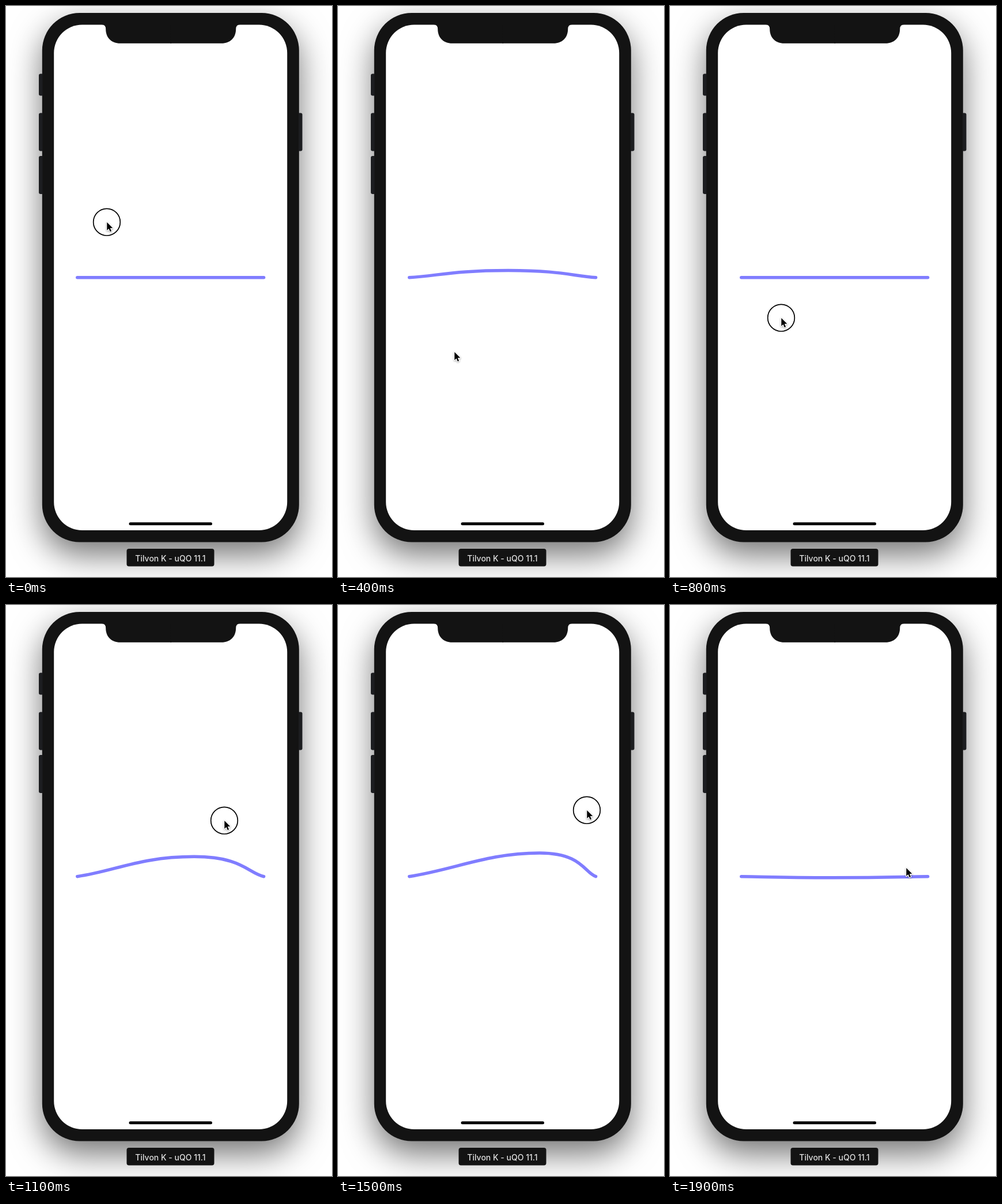
Recreate the animation shown at these times as an HTML page with a canvas. Size 566 px wide and 990 px high, loop 2000 ms.

```html
<!DOCTYPE html>
<html lang="en">
<head>
<meta charset="utf-8">
<title>Plucked string</title>
<style>
  html, body { margin: 0; width: 100%; height: 100%; overflow: hidden; background: #fff; }
  canvas { display: block; }
</style>
</head>
<body>
<canvas id="stage" width="566" height="990"></canvas>
<script>
const ctx = document.getElementById('stage').getContext('2d');

const LOOP = 2000, STEP = 100;
const MID = 285.7, HALF = 161.9, LINE_Y = 470.7;
const BODY = '#131313', BUTTON = '#1c1d20';

// Turning points of the pointer
const PATH = [
  { t: 0, x: 175, y: 375 },
  { t: 300, x: 202, y: 597 },
  { t: 400, x: 202, y: 600 },
  { t: 800, x: 193, y: 541 },
  { t: 1100, x: 379, y: 374 },
  { t: 1400, x: 432, y: 356 },
  { t: 1700, x: 432, y: 356 },
  { t: 1900, x: 410, y: 456 }
];

// dir: 1 drags the string down, -1 drags it up
const PLUCKS = [
  { press: 0, release: 333, dir: 1 },
  { press: 800, release: 1540, dir: -1 }
];

const mix = (a, b, k) => a + (b - a) * k;

function pointerAt(t) {
  const b = PATH.find(p => p.t >= t);
  const a = PATH.findLast(p => p.t <= t);
  const k = a === b ? 0 : (t - a.t) / (b.t - a.t);
  return { x: mix(a.x, b.x, k), y: mix(a.y, b.y, k) };
}

// Offset of the string's peak from the middle of the line
function pull({ x, y }, dir) {
  return {
    dx: 0.44 * (x - MID),
    dy: 0.355 * dir * Math.max(0, dir * (y - LINE_Y))
  };
}

function stringAt(t, { release, dir }) {
  if (t < release) return pull(pointerAt(t), dir);
  const { dx, dy } = pull(pointerAt(release), dir);
  const s = (t - release) / 1000;
  const swing = Math.exp(-5.6 * s) * Math.cos(2 * Math.PI * s / 0.2133);
  return { dx: dx * swing, dy: dy * swing };
}

function box(x, y, w, h, r, color) {
  ctx.fillStyle = color;
  ctx.beginPath();
  ctx.roundRect(x, y, w, h, r);
  ctx.fill();
}

function drawNotch() {
  ctx.save();
  ctx.translate(286.2, 0);
  ctx.fillStyle = BODY;
  for (const side of [-1, 1]) {
    ctx.beginPath();
    ctx.moveTo(-side, 32);
    ctx.lineTo(side * 120, 32);
    ctx.quadraticCurveTo(side * 113, 32.5, side * 113, 40);
    ctx.bezierCurveTo(side * 113, 55, side * 103, 64.8, side * 88, 64.8);
    ctx.lineTo(-side, 64.8);
    ctx.fill();
  }
  ctx.restore();
}

function drawPhone() {
  ctx.fillStyle = '#fff';
  ctx.fillRect(0, 0, 566, 990);

  ctx.save();
  ctx.shadowColor = 'rgba(0,0,0,.55)';
  ctx.shadowBlur = 56;
  ctx.shadowOffsetY = 22;
  box(62.8, 12, 446, 917.5, 65, BODY);
  ctx.restore();

  box(57, 117.5, 6.5, 38, [3, 0, 0, 3], BUTTON);
  box(57, 185.5, 6.5, 66, [3, 0, 0, 3], BUTTON);
  box(57, 260, 6.5, 66, [3, 0, 0, 3], BUTTON);
  box(508, 185.5, 6.5, 66, [0, 3, 3, 0], BUTTON);

  box(83.2, 32.5, 405, 876.5, 49, '#fff');
  drawNotch();
  box(213.5, 895.2, 144.5, 5, 2.5, '#000');

  box(209.5, 941, 152, 30.5, 4, BODY);
  ctx.fillStyle = '#e0e0e0';
  ctx.font = '500 14px Inter, sans-serif';
  ctx.textAlign = 'center';
  ctx.fillText('Tilvon K - uQO 11.1', 285.5, 962.5);
}

function drawString({ dx, dy }) {
  ctx.save();
  ctx.translate(MID, LINE_Y);
  ctx.strokeStyle = '#807dff';
  ctx.lineWidth = 5.5;
  ctx.lineCap = 'round';
  ctx.beginPath();
  // Each half runs from the peak to its end; the shorter half bends harder.
  for (const side of [-1, 1]) {
    const skew = side * dx / 64;
    const x = k => mix(dx, side * HALF, k);
    ctx.moveTo(dx, dy);
    ctx.bezierCurveTo(
      x(0.575 + 0.175 * skew), dy,
      x(0.725 + 0.075 * skew), dy * (0.225 - 0.075 * skew),
      x(1), 0);
  }
  ctx.stroke();
  ctx.restore();
}

const ARROW = new Path2D('M0 0V14L3.2 11L5.5 16.2L7.8 15.2L5.5 10.1H10Z');

function drawPointer({ x, y }, pressed) {
  if (pressed) {
    ctx.strokeStyle = '#000';
    ctx.lineWidth = 1.7;
    ctx.beginPath();
    ctx.arc(x, y - 0.3, 23.3, 0, 2 * Math.PI);
    ctx.stroke();
  }
  ctx.save();
  ctx.translate(x + 0.3, y);
  ctx.lineJoin = 'round';
  ctx.strokeStyle = '#fff';
  ctx.lineWidth = 2.4;
  ctx.shadowColor = 'rgba(0,0,0,.35)';
  ctx.shadowBlur = 3;
  ctx.shadowOffsetY = 1;
  ctx.stroke(ARROW);
  ctx.shadowColor = 'transparent';
  ctx.fillStyle = '#000';
  ctx.fill(ARROW);
  ctx.restore();
}

function frame() {
  const t = Math.floor(performance.now() % LOOP / STEP) * STEP;
  const pluck = PLUCKS.findLast(p => p.press <= t);
  drawPhone();
  drawString(stringAt(t, pluck));
  drawPointer(pointerAt(t), t < pluck.release);
  requestAnimationFrame(frame);
}
frame();
</script>
</body>
</html>
```
